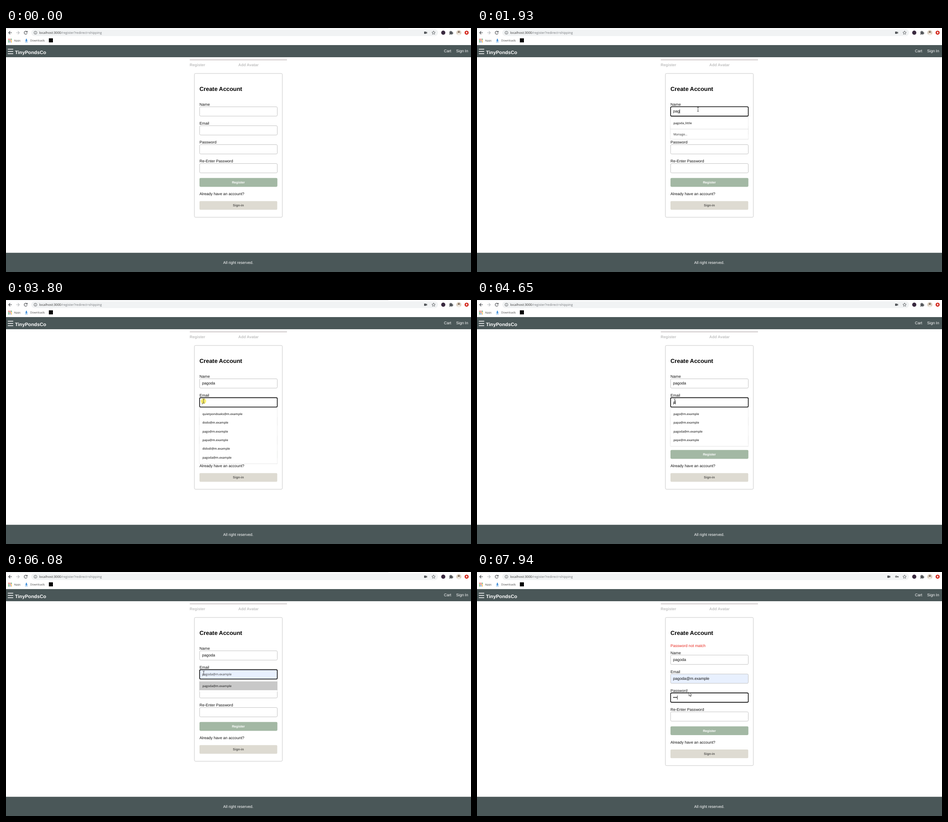
Write an HTML page that moves like this. It is 1031 px wide and 543 px high and loops after 8 s.

```html
<!DOCTYPE html>
<html lang="en">
<head>
<meta charset="utf-8">
<title>Create Account</title>
<style>
html, body { margin: 0; width: 100%; height: 100%; overflow: hidden; background: #fff; }
svg { display: block; width: 1031px; height: 543px; }
text { font: 8.6px "Liberation Sans", Arial, sans-serif; fill: #111; text-rendering: geometricPrecision; white-space: pre; }
.ui { font: 6.85px "Open Sans", "Noto Sans", sans-serif; fill: #333; }
.row { font-size: 6.6px; font-weight: 600; }
.url { font-size: 7.23px; }
.mark { font-size: 6.2px; fill: #444; }
.bold { font-weight: bold; }
.step { font-weight: bold; fill: #c0c0c0; }
.light { fill: #fff; }
.brand { font-size: 10.75px; font-weight: bold; fill: #fff; }
.head { font-size: 12.86px; font-weight: bold; fill: #000; }
.btn { font-size: 7.2px; font-weight: bold; text-anchor: middle; }
.input { font-size: 8.7px; }
.error { fill: #e8261c; }
.line { fill: none; stroke: #4a4d51; stroke-width: 1.1; }
.menu { fill: #fff; filter: drop-shadow(0 .7px .7px rgba(0, 0, 0, .45)); }
</style>
</head>
<body>
<svg viewBox="0 0 1031 543">
  <!-- browser bar -->
  <rect width="848" height="1" fill="#e3e5e8"/>
  <rect x="56" y="3" width="902" height="15" rx="7.5" fill="#f1f3f4"/>
  <path class="line" d="M13 10.5H6M9.3 7 5.8 10.5l3.5 3.5"/>
  <path class="line" style="stroke:#b9bbbe" d="M22.5 10.5h7M26.2 7l3.5 3.5-3.5 3.5"/>
  <path class="line" d="M46.3 8.3A3.4 3.4 0 1 0 47 11.3M47.2 6.5v2.8h-2.8"/>
  <g class="line" style="stroke-width:.8">
    <circle cx="65.3" cy="10.5" r="3.3"/>
    <path d="M65.3 10v2.4M65.3 8.3v.9"/>
    <path d="M948 6.6l1.1 2.6 2.8.2-2.1 1.9.6 2.7-2.4-1.4-2.4 1.4.6-2.7-2.1-1.9 2.8-.2z"/>
  </g>
  <text class="ui url" x="73.5" y="13">localhost:3000<tspan fill="#75787c">/register?redirect=shipping</tspan></text>
  <circle cx="969.5" cy="10.4" r="4.6" fill="#3a2a40"/>
  <path d="M983 8h2.2a1.3 1.3 0 1 1 2.4 0h2.2v2.2a1.3 1.3 0 1 1 0 2.4v2h-2.3a1.2 1.2 0 0 0-2.3 0H983v-2.2a1.2 1.2 0 0 0 0-2.3z" fill="#55585c"/>
  <circle cx="1004" cy="10.4" r="5.6" fill="#d9cdbd"/>
  <circle cx="1004" cy="8.8" r="2" fill="#7d6a5c"/>
  <path d="M1000.4 14.3a3.7 3.7 0 0 1 7.2 0 5.6 5.6 0 0 1-7.2 0z" fill="#f4efe8"/>
  <circle cx="1021.3" cy="10.4" r="4.5" fill="#d3271c"/>
  <path d="M1020.5 8h1.6v2h1.6l-2.4 2.7-2.4-2.7h1.6z" fill="#fff"/>
  <g id="apps"></g>
  <text class="ui mark" x="17.8" y="29.8">Apps</text>
  <path d="M44.2 24h2v3h2l-3 3-3-3h2zM42.3 30.6h5.8v1h-5.8z" fill="#2f86d8"/>
  <text class="ui mark" x="53.8" y="29.8">Downloads</text>
  <rect x="95" y="23" width="9" height="9" fill="#000"/>

  <!-- page frame -->
  <path d="M0 38h1031v27H0zM0 500.3h1031V543H0z" fill="#4a5758"/>
  <path d="M4 47.3h12M4 52.3h12M4 57.3h12" stroke="#fff" stroke-width="1.4"/>
  <text class="brand" x="20" y="57.6">TinyPondsCo</text>
  <text class="light" x="971" y="54">Cart</text>
  <text class="light" x="998" y="54">Sign In</text>
  <text class="light" x="515" y="524.6" text-anchor="middle">All right reserved.</text>
  <path d="M407.5 70.9H623" stroke="#b5abac" stroke-width="1.2"/>
  <text class="step" x="407.3" y="84.7">Register</text>
  <text class="step" x="515" y="84.7">Add Avatar</text>
  <g id="scene"></g>
</svg>
<script>
const LOOP = 8000, TICK = 76, BLINK = 550, ROW = 19.45;
const nameKeys = [1630, 1780, 1930, 2160, 2240, 2320];
const mailKeys = [4650, 4820, 5060, 5210, 5380, 5450];
const passKeys = [7640, 7710, 7940];
const caretResets = [840, ...nameKeys, 3720, ...mailKeys, 6310, 7240, ...passKeys];
const user = "pagoda", handle = "pagoda_little", host = "@m.example";
const names = [handle, "dodo", "didodi"];
const mails = ["quietpondoaks", "dodo", "pago", "papa", "didodi", user, "pepe"].map(n => n + host);
const labels = ["Name", "Email", "Password", "Re-Enter Password"];
const fieldTop = i => 175.3 + 42.1 * i;

// pointer moves: start time, ticks taken, end x, end y
const moves = [
  [70, 10, 490, 181],
  [3100, 1, 443, 206],
  [3170, 1, 402, 225],
  [3340, 1, 395, 226],
  [3410, 3, 438.3, 225],
  [6860, 3, 507, 284],
  [7160, 2, 470, 267.5],
];

const ruler = document.createElement("canvas").getContext("2d");
ruler.font = '8.7px "Liberation Sans", Arial, sans-serif';

const rect = (x, y, w, h, attrs) => `<rect x="${x}" y="${y}" width="${w}" height="${h}" ${attrs}/>`;
const text = (x, y, s, cls = "") => `<text class="${cls}" x="${x}" y="${y}">${s}</text>`;
const pressed = (keys, t) => keys.filter(k => t >= k).length;
const within = (t, a, b) => t >= a && t < b;

document.getElementById("apps").innerHTML =
  ["#e0483c", "#e0483c", "#3f9a55", "#3f9a55", "#e0483c", "#e2a52c", "#3f9a55", "#4580d8", "#e2a52c"]
    .map((c, i) => rect(5 + i % 3 * 3, 24 + (i / 3 | 0) * 3, 2, 2, `fill="${c}"`)).join("");

function pointer(t) {
  let x = 969, y = 546;
  for (const [at, ticks, tx, ty] of moves) {
    if (t < at) break;
    const p = Math.min(1, (Math.floor((t - at) / TICK) + 1) / ticks);
    x += (tx - x) * p;
    y += (ty - y) * p;
  }
  return [x, y];
}

function field(i, value, { focused, filled, preview, caret }) {
  const y = fieldTop(i);
  const border = focused ? 'stroke="#111" stroke-width="1.6"' : 'stroke="#c4c4c4" stroke-width="1"';
  let out = text(429, y - 2.3, labels[i])
    + rect(429.3, y, 172.2, 20.8, `rx="2.4" fill="${filled ? "#e8f0fe" : "#fff"}" ${border}`)
    + text(434.7, y + (preview ? 12.8 : 13.1), value, preview ? "ui" : "input");
  if (caret) out += rect(434.7 + ruler.measureText(value).width, y + 5.8, 0.8, 9, 'fill="#000"');
  return out;
}

function menu(i, items, hot, manage) {
  const top = fieldTop(i) + 22, rows = top + 4.2, end = rows + items.length * ROW + 4;
  let out = rect(428.8, top, 173, end - top + (manage ? 22.6 : 0), 'class="menu"');
  if (hot) out += rect(428.8, rows, 173, ROW, 'fill="#c8c8c8"');
  items.forEach((s, n) => out += text(435.4, rows + n * ROW + 12, s, "ui row"));
  if (manage) out += rect(428.8, end - 0.4, 173, 0.9, 'fill="#dcdcdc"') + text(435.4, end + 13.8, "Manage...", "ui");
  return out;
}

function cursor(x, y, beam) {
  return beam
    ? `<path transform="translate(${x} ${y})" d="M-2-4.7Q0-4.7 0-3.7Q0-4.7 2-4.7M0-3.7V3.7M-2 4.7Q0 4.7 0 3.7Q0 4.7 2 4.7" fill="none" stroke="#333" stroke-width=".9"/>`
    : `<path transform="translate(${x} ${y})" d="M0 0v8.6l2-1.8 1.3 3 1.4-.6-1.3-2.9h2.7z" fill="#fff" stroke="#222" stroke-width=".8"/>`;
}

function scene(t) {
  const focus = t < 840 ? -1 : t < 3720 ? 0 : t < 7240 ? 1 : 2;
  const lastReset = caretResets.filter(k => k <= t).pop() ?? 0;
  const blinkOn = (t - lastReset) % (2 * BLINK) < BLINK;
  const shift = t >= passKeys[0] ? 9.6 : 0;
  const hotName = within(t, 3100, 3170), hotMail = within(t, 6080, 6310);
  const name = user.slice(0, pressed(nameKeys, t));
  const mail = user.slice(0, pressed(mailKeys, t));
  const values = [
    hotName ? handle : name,
    t >= 6080 ? user + host : mail,
    "•".repeat(pressed(passKeys, t)),
    "",
  ];
  const previews = [hotName, hotMail], filled = [hotName, t >= 6080];

  let out = rect(417.7, 101.2, 195, 320 + shift, 'rx="2.5" fill="#fff" stroke="#c8c8c8"')
    + text(429, 140.3, "Create Account", "head");
  if (shift) out += text(429, 167.2, "Password not match", "error");

  out += `<g transform="translate(0 ${shift})">`;
  values.forEach((v, i) => out += field(i, v, {
    focused: focus === i, filled: filled[i], preview: previews[i],
    caret: focus === i && blinkOn && !previews[i],
  }));
  out += rect(429, 333.8, 172.7, 19.6, 'rx="2.4" fill="#a3b8a4"') + text(515.3, 346.2, "Register", "btn light")
    + text(429, 372, "Already have an account?")
    + rect(429, 385.3, 172.4, 19.3, 'rx="2" fill="#dedbd2"') + `<g opacity=".65">${text(515.3, 397.4, "Sign-in", "btn")}</g>`;
  if (within(t, 910, 3720)) out += menu(0, names.filter(s => s.startsWith(name)), hotName, true);
  if (within(t, 3720, 6310)) out += menu(1, mails.filter(s => s.startsWith(mail)).slice(0, 6), hotMail);
  out += "</g>";

  // address bar icons
  const cam = shift ? 909.8 : 927;
  out += `<path transform="translate(${cam} 8)" d="M0 0h4.6v1.7l2-1.5v4.6l-2-1.5V5H0z" fill="#55585c"/>`;
  if (shift) out += '<path d="M931.5 9.6h3.4v1.5h-.8v1.3h-1.4v-1.3h-1.2a2.2 2.2 0 1 1 0-1.5zM929.4 9.6a.8.8 0 1 0 .01 0z" fill="#55585c" fill-rule="evenodd"/>';

  const [x, y] = pointer(t);
  const over = labels.some((_, i) => within(y - shift, fieldTop(i), fieldTop(i) + 21));
  if (within(t, 840, 1070) || within(t, 3640, 3870) || within(t, 7240, 7400))
    out += `<circle cx="${x - 0.3}" cy="${y}" r="6" fill="#ffee3c" opacity=".7"/>`;
  return out + cursor(x, y, over && within(x, 429, 602));
}

const root = document.getElementById("scene"), start = performance.now();
let shown = "";
function frame() {
  const next = scene((performance.now() - start) % LOOP);
  if (next !== shown) root.innerHTML = shown = next;
  requestAnimationFrame(frame);
}
frame();
</script>
</body>
</html>
```
